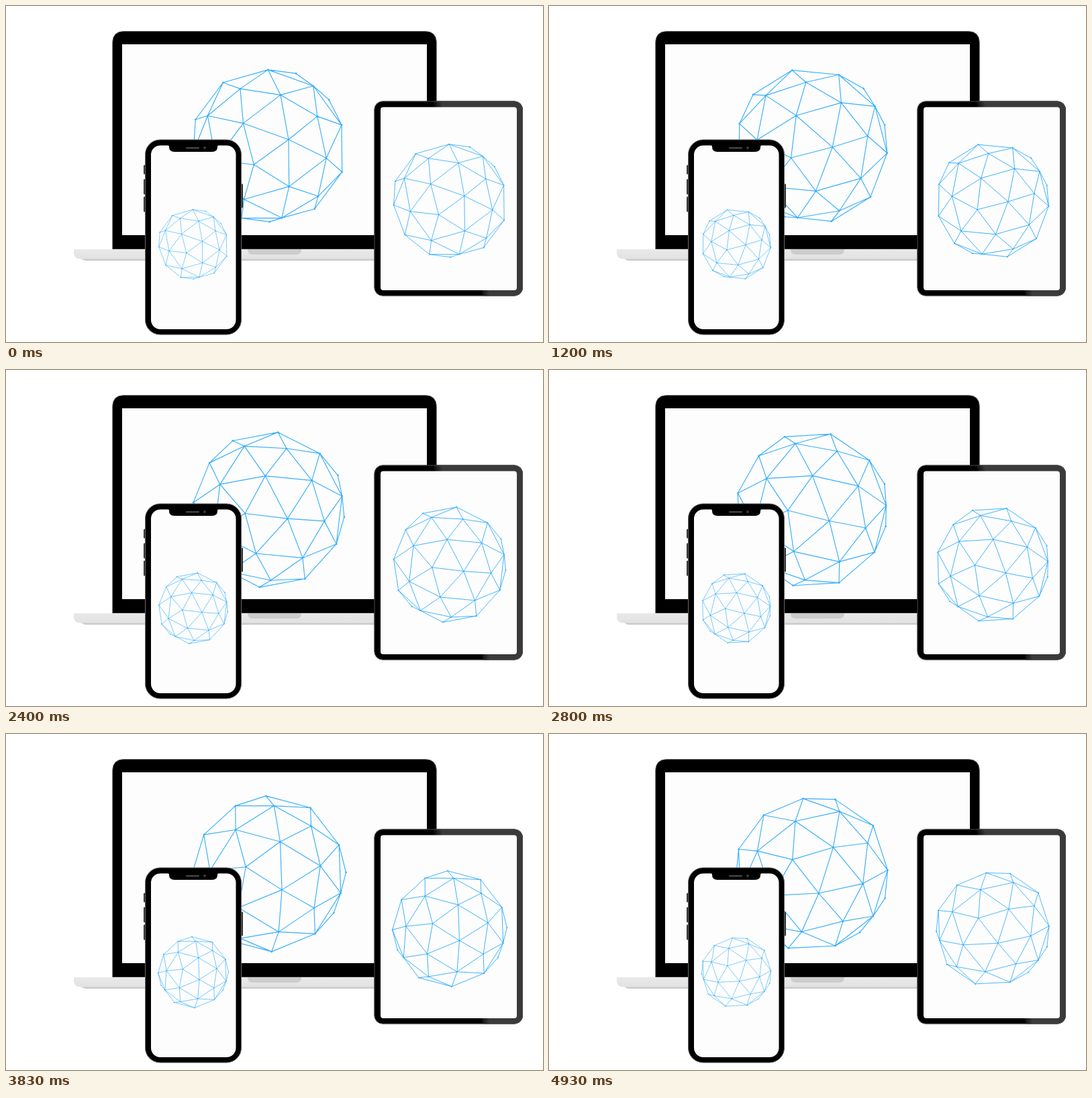
Recreate the animation shown at these times as an HTML page. Size 800 px wide and 500 px high, loop 5010 ms.

```html
<!DOCTYPE html>
<html lang="en">
<head>
<meta charset="utf-8">
<title>Wireframe sphere on three devices</title>
<style>
  html, body { margin: 0; width: 100%; height: 100%; overflow: hidden; background: #fff; }
  svg { display: block; width: 100vw; height: 100vh; }
  .wire { fill: none; stroke: #38aefb; stroke-linejoin: round; stroke-linecap: round; }
</style>
</head>
<body>
<svg viewBox="0 0 800 500">
  <defs>
    <linearGradient id="base" x1="0" y1="0" x2="0" y2="1">
      <stop offset="0" stop-color="#e9e9e9"/>
      <stop offset="1" stop-color="#e2e2e2"/>
    </linearGradient>
    <linearGradient id="gloss" gradientUnits="userSpaceOnUse" x1="636" y1="141" x2="648" y2="138">
      <stop offset="0" stop-color="#0a0a0a"/>
      <stop offset="1" stop-color="#3a3a3a"/>
    </linearGradient>
    <clipPath id="lidScreen"><rect x="173" y="57" width="454" height="284"/></clipPath>
    <clipPath id="tabletBody"><rect x="548.5" y="141.5" width="221.5" height="290" rx="13"/></clipPath>
  </defs>

  <g id="laptop">
    <path d="M158.5 362V55q0-17.500 17.500-17.500H624q17.500 0 17.500 17.500V362z" fill="#000" stroke="#8c8c8c" stroke-width=".8"/>
    <rect x="173" y="57" width="454" height="284" fill="#fdfdfd"/>
    <path d="M112 375H688q-2 4-8 4H120q-6 0-8-4z" fill="#cbcbcb"/>
    <path d="M101 362H699V367q0 9.500-11 9.500H112q-11 0-11-9.500z" fill="url(#base)"/>
    <path d="M360 362H440q0 8-8 8H368q-8 0-8-8z" fill="#cdcdcd"/>
    <g clip-path="url(#lidScreen)"><g class="wire" data-at="391.5 208 1.166" data-pen=".98"></g></g>
  </g>

  <g id="phone">
    <path d="M206.500 238V249M206.500 259V279M206.500 285V305M351.500 266V299" stroke="#333" stroke-width="3" stroke-linecap="round"/>
    <rect x="207.500" y="199" width="143" height="290" rx="22" fill="#000" stroke="#6a6a6a"/>
    <rect x="216" y="207.500" width="126.500" height="273.500" rx="14" fill="#fdfdfd"/>
    <path d="M241 207H317q-2 0-2 3 0 7-8 7H251q-8 0-8-7 0-3-2-3z" fill="#000"/>
    <rect x="268" y="210" width="20" height="2.400" rx="1.200" fill="#444"/>
    <circle cx="296" cy="211" r="2" fill="#3a3a3a"/>
    <g class="wire" data-at="279 354.600 .532" data-pen="1.15"></g>
  </g>

  <g id="tablet">
    <g clip-path="url(#tabletBody)">
      <rect x="548" y="141" width="223" height="291" fill="#000"/>
      <path d="M636 141H771V432H711z" fill="url(#gloss)"/>
    </g>
    <rect x="549" y="142" width="220.500" height="289" rx="12.500" fill="none" stroke="#4a4a4a"/>
    <rect x="558" y="150.500" width="203" height="272.500" rx="4" fill="#fdfdfd"/>
    <g class="wire" data-at="661 289.700 .866" data-pen="1"></g>
  </g>
</svg>
<script>
const LOOP = 5010, LAST = 4930, SPEED = 17.82 / 1000; // degrees per ms
const PHI = (1 + Math.sqrt(5)) / 2, RADIUS = 100;
const EDGE_ON = .08; // faces turned further away than this are hidden

const dot = (a, b) => a[0] * b[0] + a[1] * b[1] + a[2] * b[2];
const sub = (a, b) => a.map((v, i) => v - b[i]);
const cross = (a, b) => [a[1] * b[2] - a[2] * b[1], a[2] * b[0] - a[0] * b[2], a[0] * b[1] - a[1] * b[0]];
const unit = a => a.map(v => v / Math.hypot(...a));
const middle = (a, b) => unit(a.map((v, i) => v + b[i]));

// Axes of the icosahedron as seen by the viewer (y up, z towards us).
const front = unit([.2523, .0798, .9643]);
const up = unit(cross(front, [.7715, .5868, -.2504]));
const AXES = [cross(up, front), up, front];
const pose = p => unit([0, 1, 2].map(i => p.reduce((sum, v, k) => sum + v * AXES[k][i], 0)));

function corners() {
  const list = [];
  for (const s of [-1, 1]) for (const t of [-PHI, PHI])
    list.push([s, 0, t], [t, s, 0], [0, t, s]);
  return list.map(pose);
}

// Every icosahedron face split into four, with new points pushed onto the sphere.
function geodesicFaces() {
  const v = corners(), faces = [];
  const near = (a, b) => dot(a, b) > .4;
  for (let i = 0; i < 12; i++) for (let j = i + 1; j < 12; j++) for (let k = j + 1; k < 12; k++) {
    const a = v[i], b = v[j], c = v[k];
    if (!near(a, b) || !near(b, c) || !near(a, c)) continue;
    const ab = middle(a, b), bc = middle(b, c), ca = middle(c, a);
    faces.push([a, ab, ca], [b, bc, ab], [c, ca, bc], [ab, bc, ca]);
  }
  return faces;
}

function facesViewer([a, b, c]) {
  const n = unit(cross(sub(b, a), sub(c, a)));
  return n[2] * Math.sign(dot(n, a)) > EDGE_ON;
}

function wirePaths() {
  const edges = new Set(), dots = new Set();
  const at = p => `${(p[0] * RADIUS).toFixed(2)} ${(-p[1] * RADIUS).toFixed(2)}`;
  for (const face of geodesicFaces().filter(facesViewer)) {
    const [a, b, c] = face.map(at);
    for (const pair of [[a, b], [b, c], [c, a]]) edges.add("M" + pair.sort().join("L"));
    for (const p of [a, b, c]) dots.add(`M${p}h.01`);
  }
  return [[...edges].join(""), [...dots].join("")];
}

const paths = wirePaths();
const wires = [...document.querySelectorAll(".wire")].map(g => {
  const [x, y, scale] = g.dataset.at.split(" ");
  paths.forEach((d, i) => {
    const path = document.createElementNS("http://www.w3.org/2000/svg", "path");
    path.setAttribute("d", d);
    path.setAttribute("stroke-width", g.dataset.pen * (i ? 2.3 : 1));
    g.append(path);
  });
  return { g, place: `translate(${x} ${y}) scale(${scale})` };
});

// The picture holds for 30 ms, then 70 ms, in turn.
function heldTime(t) {
  const rest = t % 100;
  return Math.min(LAST, t - rest + (rest >= 30 ? 30 : 0));
}

function draw(now) {
  const angle = heldTime(now % LOOP) * SPEED;
  for (const { g, place } of wires) g.setAttribute("transform", `${place} rotate(${angle})`);
}

const start = performance.now();
function tick() {
  draw(performance.now() - start);
  requestAnimationFrame(tick);
}
tick();
</script>
</body>
</html>
```
